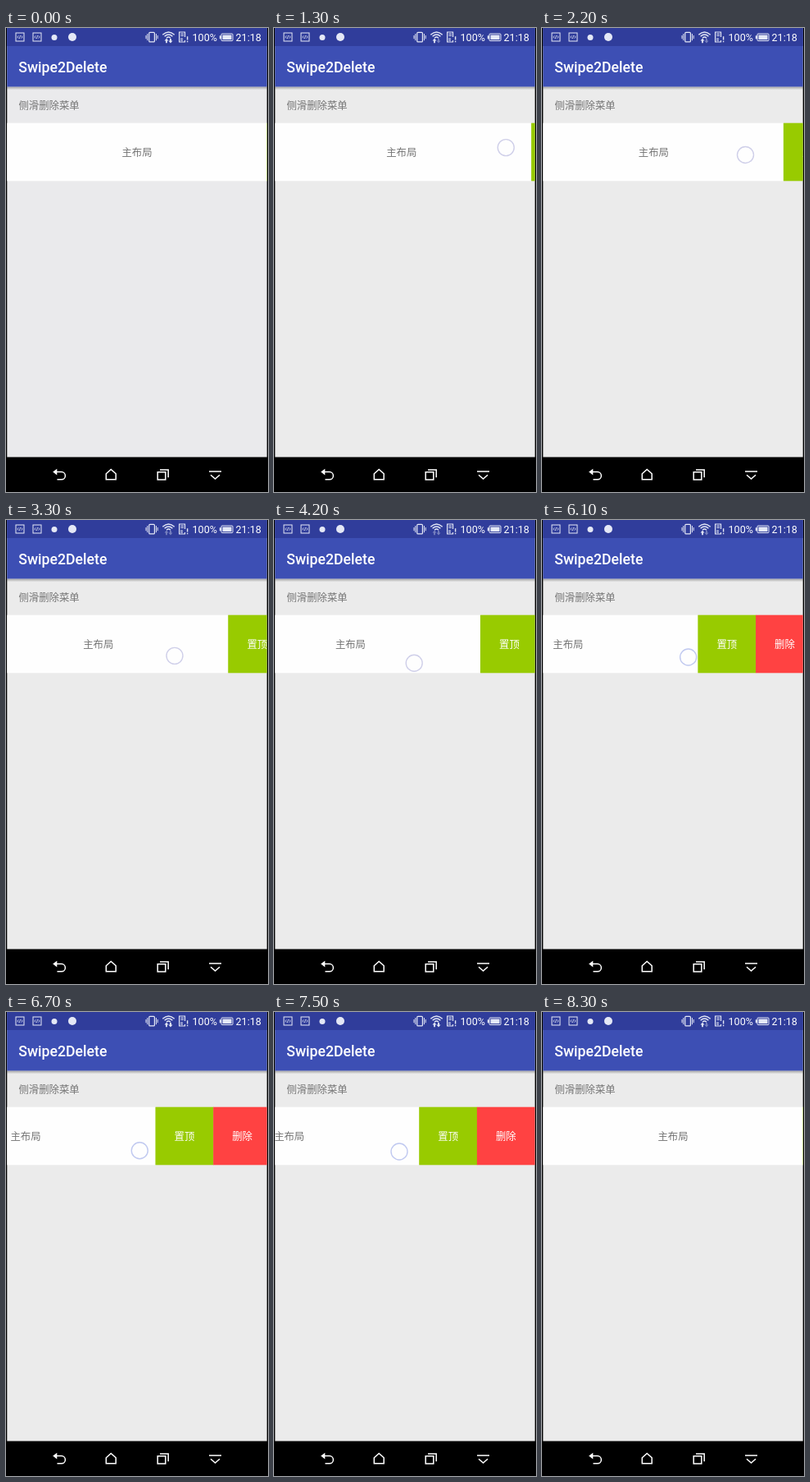
These frames come from a looping animation (320 by 565 pixels, 8400 ms). An HTML page:

```html
<!DOCTYPE html>
<html lang="zh-CN">
<head>
<meta charset="utf-8">
<title>Swipe2Delete</title>
<style>
  html, body { margin: 0; width: 100%; height: 100%; overflow: hidden; background: #000; }
  svg { display: block; width: 100%; height: 100%; }
  text { font-family: Roboto, sans-serif; fill: #fff; }
  .cjk { font: 12.37px "Noto Sans CJK SC", "Noto Sans CJK", sans-serif; }
  .mid { text-anchor: middle; }
  .grey { fill: #757575; }
  .line { fill: none; stroke: #e4e8f6; }
  .solid { fill: #e4e8f6; }
  .nav { fill: none; stroke: #fff; stroke-width: 1.5; }
</style>
</head>
<body>
<svg viewBox="0 0 320 565">
  <defs>
    <clipPath id="screen"><rect x="1.3" width="317.4" height="522.4"/></clipPath>
    <linearGradient id="shade" x2="0" y2="1">
      <stop stop-color="#000" stop-opacity=".3"/>
      <stop offset="1" stop-color="#000" stop-opacity="0"/>
    </linearGradient>
    <g id="code">
      <rect class="line" x="-5" y="-5" width="10" height="10"/>
      <path class="line" stroke-width=".8" d="M-1.7 -1.6L-3.2 0L-1.7 1.6M1.7 -1.6L3.2 0L1.7 1.6M.6 -2L-.6 2"/>
    </g>
    <path id="arrow" class="solid" d="M0 -2.8L2.5 0H.9V2.6H-.9V0H-2.5Z"/>
  </defs>

  <rect width="320" height="565"/>
  <g clip-path="url(#screen)">
    <rect id="page" width="320" height="523"/>
    <rect y="71.5" width="320" height="4" fill="url(#shade)"/>
    <rect width="320" height="71.5" fill="#3d4fb4"/>
    <rect width="320" height="22" fill="#303d9b"/>
    <text x="15.3" y="53.5" font-size="17.67" font-weight="500">Swipe2Delete</text>
    <text class="cjk grey" x="15.5" y="99">侧滑删除菜单</text>

    <g id="row">
      <rect x="1" y="115.7" width="318" height="70.6" fill="#fefefe"/>
      <text class="cjk grey mid" x="160" y="156">主布局</text>
      <rect x="318.5" y="115.7" width="71" height="70.6" fill="#98cb00"/>
      <text class="cjk mid" x="354" y="156">置顶</text>
      <rect x="389.2" y="115.7" width="71" height="70.6" fill="#ff4242"/>
      <text class="cjk mid" x="424.6" y="156">删除</text>
    </g>
    <circle id="touch" r="10" fill="#fff" fill-opacity=".5" stroke-width="1.4"/>
  </g>

  <!-- status bar -->
  <use href="#code" x="17" y="11"/>
  <use href="#code" x="38" y="11"/>
  <circle class="solid" cx="59" cy="11.5" r="3.5"/>
  <circle class="solid" cx="81" cy="11" r="5"/>
  <rect class="line" x="174.8" y="5.3" width="6.6" height="11.6" rx="1" stroke-width="1.2"/>
  <path class="line" d="M172.8 7V15.2M183.4 7V15.2M171 9V13.2M185.2 9V13.2"/>
  <path class="line" stroke-width="1.4" d="M191.3 8.2Q198.5 1.6 205.7 8.2M193.6 10.3Q198.5 5.8 203.4 10.3M196 12.2Q198.5 10 201 12.2"/>
  <use id="up" href="#arrow" transform="translate(196 15.6)"/>
  <use id="down" href="#arrow" transform="translate(201 15.6) rotate(180)"/>
  <path class="line" stroke-width="1.2" d="M218.5 11V5H211.6V17H218.5V15"/>
  <path class="line" d="M213.3 7.2H217M213.3 9.3H217M213 13H216M213 15H216"/>
  <path class="line" stroke-width="1.4" d="M221.6 10.2V14.6M221.6 15.8V17.2"/>
  <text x="227.6" y="15.9" font-size="12.5">100%</text>
  <rect class="line" x="263" y="7" width="14" height="8.6" rx="1"/>
  <rect class="solid" x="264.5" y="8.5" width="11" height="5.6"/>
  <rect class="solid" x="260.8" y="9.3" width="2" height="4"/>
  <text x="280.6" y="15.9" font-size="12.5">21:18</text>

  <!-- navigation bar -->
  <g class="nav">
    <path fill="#fff" stroke="none" d="M57.2 540.6L62.3 536.8V544.4Z"/>
    <path d="M61 540.6H67.8A4.6 4.6 0 0 1 67.8 549.8H62.5"/>
    <path d="M122.3 549.8V542.8L128.2 537.5L134.2 542.8V549.8Z"/>
    <path d="M185.2 540.7H194.8V550H185.2ZM188 538H198.2V547.3"/>
    <path d="M248 540H263M250 544.3L255.5 549L261 544.3"/>
  </g>
</svg>

<script>
const LOOP = 8400, TICK = 100, OPEN = 141.3;
const FREEZES = [1700, 2600, 3700], FREEZE = 300;

const el = id => document.getElementById(id);
const ramp = (time, from, to) => Math.max(0, Math.min(1, (time - from) / (to - from)));

function stall(time) {
  return FREEZES.find(start => time > start && time < start + FREEZE) ?? time;
}

// How far the row is pulled left: two drags, a slow finish, then closing.
function pull(time) {
  return 73 * ramp(time, 1100, 4500)
    + 52.5 * ramp(time, 4900, 5600)
    + 15.8 * ramp(time, 5900, 7100)
    - OPEN * ramp(time, 7500, 8300);
}

function draw(time) {
  const offset = pull(time);
  el("page").setAttribute("fill", time < 300 ? "#eaeaec" : "#ebebeb");
  el("row").setAttribute("transform", `translate(${-offset} 0)`);

  // The row follows the finger at roughly half its speed.
  const firstDrag = time < 5000, left = OPEN - offset;
  const touch = el("touch");
  touch.style.display = time >= 1100 && time < 8000 ? "" : "none";
  touch.setAttribute("cx", firstDrag ? 291 - 1.8 * offset : 153 + 1.95 * left);
  touch.setAttribute("cy", firstDrag ? 143.6 + .46 * offset : 170 - .23 * left);
  touch.setAttribute("stroke", firstDrag ? "#cfcfe9" : "#c0c9f0");

  // Wi-Fi traffic arrows
  const both = time < 1300 || (time >= 6500 && time < 7600);
  const quiet = time >= 2900 && time < 5900;
  el("up").style.opacity = quiet ? .4 : 1;
  el("down").style.opacity = both ? 1 : .4;
}

function frame() {
  const time = performance.now() % LOOP;
  draw(stall(Math.floor(time / TICK) * TICK));
  requestAnimationFrame(frame);
}
frame();
</script>
</body>
</html>
```
